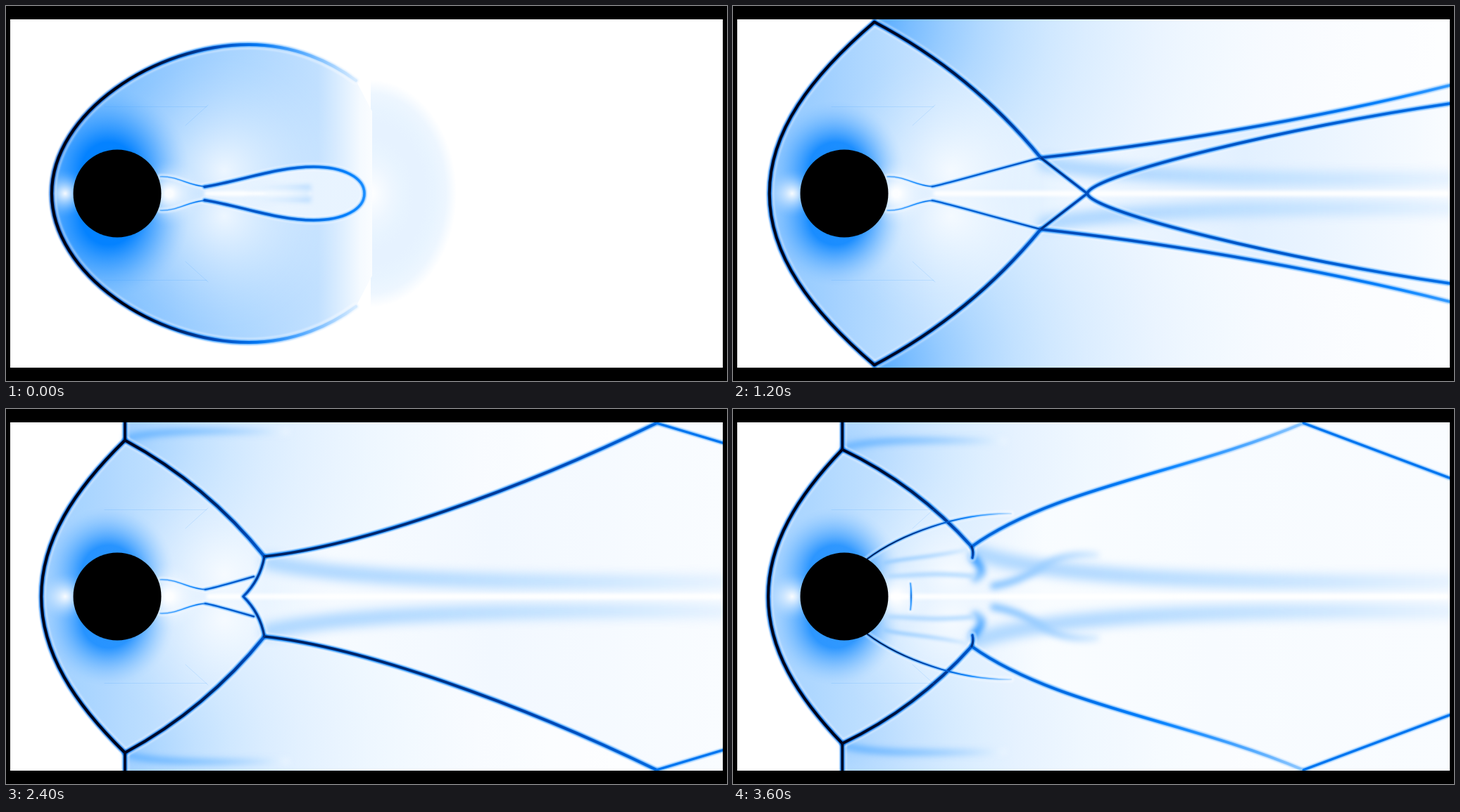
An HTML page with a canvas for the animation above (4 s loop, 1024 by 534 pixels).

```html
<!DOCTYPE html>
<html lang="en">
<head>
<meta charset="utf-8">
<title>Flow past a cylinder</title>
<style>
html, body { margin: 0; width: 100%; height: 100%; overflow: hidden; background: #000; }
canvas { display: block; }
</style>
</head>
<body>
<canvas id="stage" width="1024" height="534"></canvas>
<script>
const canvas = document.getElementById('stage');
const ctx = canvas.getContext('2d');
const STEP = 400, COUNT = 10, AXIS = 267, TOP = 19, LEFT = 6, RIGHT = 1018;

// Key poses of the shock system behind the cylinder; steps between are blended.
// bend: heights of the two handles of the outer shock, as parts of its rise
const poses = [
  { at: 3, triple: [437, 216], stem: [503, 267], exit: [1018, 113], bend: [.15, .5], fade: [.72, .4] },
  { at: 5, triple: [392, 230], stem: [380, 267], exit: [1018, 25], bend: [.22, .6], fade: [.95, .75] },
  { at: 6, triple: [367, 210], stem: [337, 267], exit: [924, 20], bend: [.08, .5], fade: [.88, .6] },
  { at: 8, triple: [328, 183], stem: [304, 231], exit: [840, 20], bend: [.32, .38], fade: [.8, .4] },
  { at: 9, triple: [339, 196], stem: [340, 212], exit: [810, 20], bend: [.48, .6], fade: [.62, .22] }
];

const lerp = (a, b, k) => a + (b - a) * k;
const clamp = (v, lo = 0, hi = 1) => Math.min(hi, Math.max(lo, v));
const decay = (s, rate) => Math.exp(-s / rate);
const first = c => c.slice(0, 2), last = c => c.slice(-2);

function poseAt(s) {
  const i = Math.max(1, poses.findIndex(p => p.at >= s));
  const a = poses[i - 1], b = poses[i], k = (s - a.at) / (b.at - a.at);
  const blend = key => a[key].map((v, j) => lerp(v, b[key][j], k));
  return { triple: blend('triple'), stem: blend('stem'), exit: blend('exit'), bend: blend('bend'), fade: blend('fade') };
}

// Intensity scale: white, blue, deep blue, black
const scale = [[255, 255, 255], [128, 192, 255], [0, 128, 255], [0, 68, 176], [0, 0, 20]];
function tint(v) {
  const x = clamp(v) * 4, i = Math.min(3, Math.floor(x));
  return `rgb(${scale[i].map((c, j) => Math.round(lerp(c, scale[i + 1][j], x - i)))})`;
}

// Curves are flat lists: a start point, then bezier triples
function add(path, c) {
  for (let i = 2; i < c.length; i += 6) path.bezierCurveTo(...c.slice(i, i + 6));
}
function open(c) {
  const path = new Path2D();
  path.moveTo(...first(c));
  add(path, c);
  return path;
}
function region(start, curves, ...corners) {
  const path = new Path2D();
  path.moveTo(...start);
  curves.forEach(c => { path.lineTo(...first(c)); add(path, c); });
  corners.forEach(p => path.lineTo(...p));
  path.closePath();
  return path;
}
const straight = ([x, y], [u, v]) => [x, y, x, y, u, v, u, v];

// Arc whose belly stands off its chord by a part of the chord length
function bowed([x, y], [u, v], belly) {
  const dx = (v - y) * belly * 4 / 3, dy = (x - u) * belly * 4 / 3;
  return [x, y, lerp(x, u, 1 / 3) + dx, lerp(y, v, 1 / 3) + dy,
    lerp(x, u, 2 / 3) + dx, lerp(y, v, 2 / 3) + dy, u, v];
}

function bowShock(s, [cx, cy]) {
  if (s === 0) return [65, 267, 65, 152, 212, 55, 345, 55, 410, 55, 462, 80, 497, 106];
  const n = 50 + 15 * decay(s, 1.4);
  return [n, AXIS, n, lerp(AXIS, cy, .36), lerp(cx, n, .61), lerp(cy, AXIS, .32), cx, cy];
}

function bubble(s) {
  const x = 282, y = 257.5, tip = 509 + 383 * s;
  const cx = 437 + 308 * s, cy = 229 - 66 * Math.min(s, 1.6), w = cx - x, d = tip - cx;
  return [x, y, x + w * .33, lerp(y, cy, .29), cx - w * .33, cy, cx, cy,
    cx + d * .58, cy, tip, lerp(cy, AXIS, .4), tip, AXIS];
}

function outerShock({ triple: [x, y], exit: [u, v], bend }) {
  return [x, y, lerp(x, u, .25), lerp(y, v, bend[0]), lerp(x, u, .65), lerp(y, v, bend[1]), u, v];
}

function stroke(path, ink, width, blur, alpha = 1) {
  ctx.filter = `blur(${blur}px)`;
  ctx.globalAlpha = alpha;
  ctx.strokeStyle = ink;
  ctx.lineWidth = width;
  ctx.lineCap = 'round';
  ctx.stroke(path);
  ctx.filter = 'none';
  ctx.globalAlpha = 1;
}

function ramp(c, v0, v1) {
  const g = ctx.createLinearGradient(...first(c), ...last(c));
  for (let k = 0; k <= 1; k += .125) g.addColorStop(k, tint(lerp(v0, v1, k * k)));
  return g;
}

const haze = (c, v0, v1, width, blur) => stroke(open(c), ramp(c, v0, v1), width, blur);

// Sharp shocks: white halo, blue flanks and a darker core
function shocks(list) {
  list.forEach(([c, , , w]) => stroke(open(c), '#fff', w + 5, 1.5, .6));
  list.forEach(([c, v0, v1, w]) => stroke(open(c), ramp(c, v0 * .58, v1 * .58), w + .5, 1.3));
  list.forEach(([c, v0, v1, w]) => stroke(open(c), ramp(c, v0, v1), w * .62, .6));
}

function fill(path, paint) {
  ctx.fillStyle = paint;
  ctx.fill(path);
}

function glow(x, y, r0, r1, color, alpha) {
  const g = ctx.createRadialGradient(x, y, r0, x, y, r1);
  for (let k = 0; k <= 1; k += .125) g.addColorStop(k, `rgba(${color},${alpha * (1 - k) ** 1.6})`);
  ctx.fillStyle = g;
  ctx.fillRect(LEFT, TOP, RIGHT - LEFT, AXIS - TOP);
}

// Compressed gas behind the bow shock
function shadeFront(s, bow, corner) {
  const reach = s ? 1300 : 518, length = s ? 300 : 450, tone = .155 + .12 * decay(s, 3);
  const g = ctx.createLinearGradient(50, 0, RIGHT, 0);
  for (let k = 0; k <= 1; k += 1 / 32) {
    const x = lerp(50, RIGHT, k);
    g.addColorStop(k, tint(tone * Math.exp(-(((x - 50) / length) ** 1.5)) * clamp((reach - x) / 70) + (s ? .012 : 0)));
  }
  const edge = s ? [[corner[0], TOP], [RIGHT, TOP], [RIGHT, AXIS]] : [[520, 150], [520, AXIS]];
  ctx.save();
  ctx.clip(region(first(bow), [bow], ...edge));
  ctx.fillStyle = g;
  ctx.fillRect(0, 0, 1024, AXIS);
  glow(310, 235, 0, 180, '255,255,255', .8);
  glow(146, 232, 38, 92 + 22 * decay(s, 2), '0,128,255', .72 + .25 * decay(s, 4));
  glow(84, AXIS, 0, 34, '255,255,255', .95);
  glow(232, AXIS, 5, 48, '255,255,255', .95);
  ctx.restore();
}

// Gas compressed again by the shock reflected from the wall
function shadeBack(s, corner, curves) {
  const back = .18 + .22 * decay(Math.abs(s - 2.5), 1.5);
  const g = ctx.createRadialGradient(...corner, 0, ...corner, 800);
  for (let k = 0; k <= 1; k += .0625) g.addColorStop(k, tint(back * Math.exp(-3.6 * k) * (1 - k * .5)));
  const end = last(curves[curves.length - 1]);
  fill(region([corner[0], TOP], curves, [end[0], TOP]), g);
}

function shadeCore(out, startX, v) {
  const g = ctx.createLinearGradient(first(out)[0], 0, RIGHT, 0);
  [[0, 0, 0], [.15, v * .6, .9], [.5, v, 1], [1, .012, 1]].forEach(([k, t, a]) =>
    g.addColorStop(k, tint(t).replace('rgb', 'rgba').replace(')', `,${a})`)));
  fill(region([startX, AXIS], [out], [RIGHT, last(out)[1]], [RIGHT, AXIS]), g);
}

// Faint wave running ahead of the first bubble
function shadeAhead() {
  ctx.save();
  ctx.translate(518, AXIS);
  ctx.scale(122, 162);
  const g = ctx.createRadialGradient(0, 0, 0, 0, 0, 1);
  for (let k = 0; k <= 1; k += .125) g.addColorStop(k, tint(.16 * k * (1 - k) + .02 * k * (k < 1)));
  ctx.fillStyle = g;
  ctx.beginPath();
  ctx.arc(0, 0, 1, -Math.PI / 2, 0);
  ctx.lineTo(0, 0);
  ctx.fill();
  ctx.restore();
}

const axisLine = (from, to) => haze(straight([from, AXIS], [to, AXIS]), 0, 0, 7, 2.2);
const throat = [[219, 243, 245, 242, 258, 256, 283, 257], .38, .62, 2];

function drawBubble(s, corner) {
  const blob = bubble(s), list = [throat, [blob, .7, s ? .22 : .45, 5.5]];
  if (s) {
    const refl = s === 1
      ? [...corner, 430, 100, 690, 200, 868, 20]
      : [...corner, 460, 170, 720, 300, RIGHT, 158];
    shadeBack(s, corner, [refl]);
    list.push([refl, 1, .12, 7]);
  }
  shadeCore(blob, first(blob)[0], .06 - .01 * s);
  const x = 345 + 190 * s, len = 85 + 80 * s;
  axisLine(285, x + len);
  haze(straight([x, 259 - 8 * s], [x + len, 258 - 10 * s]), .05, .14, 7 + 2 * s, 3 + s);
  haze(straight([x + 25, 266 - 4 * s], [x + len, 266 - 5 * s]), .04, .12, 5, 3);
  return list;
}

function drawWake(s, corner) {
  const pose = poseAt(s), { triple, stem, exit, fade } = pose;
  const refl = bowed(corner, triple, .05), out = outerShock(pose);
  const [tx, ty] = triple, [mx, my] = stem;
  shadeBack(s, corner, [refl, out]);
  shadeCore(out, Math.min(mx, tx), .05 * decay(s - 3, 3) + .008);

  haze([tx + 6, ty + 8, tx + 90, lerp(ty, 246, .75), tx + 250, 249, RIGHT, 246], .16, .05, 22, 7);
  axisLine(s < 7 ? 288 : 225, RIGHT);

  const list = [
    [refl, .98, .66, 6.5],
    [out, ...fade, 6],
    [bowed(triple, stem, s > 3 ? .08 : 0), .82, .7, 5]
  ];
  if (s === 3) list.push([[mx, AXIS, 510, 240, 790, 172, RIGHT, 139], .7, .58, 6]);
  if (exit[0] < RIGHT) {
    const run = RIGHT - exit[0];
    list.push([straight(exit, [RIGHT, exit[1] + .44 * (run - 30)]), .55, .55, 5]);
  }
  if (s < 8) {
    const hit = s < 6 ? triple : [lerp(tx, mx, .5), lerp(ty, my, .5)];
    list.push(throat, [[283, 257, 300, 254, 325, 246, ...hit], .64, .72, 3.5]);
  } else {
    list.push(...drawSeparation(s - 8, stem));
  }
  return list;
}

// Flow torn off the cylinder, growing with k
function drawSeparation(k, [mx, my]) {
  haze([mx + 2, my, mx + 14, my + 14, mx + 18, my + 22, mx + 4, my + 30], .4, .2, 11, 4);
  haze([215, 225 - 6 * k, 245, 212, 280, 212, mx - 2, 213 - 14 * k], .2, .06, 5, 2.2);
  haze([222, 238, 250, 238, 280, 232, mx, 238], .16, .14, 6, 2.5);
  if (k) haze([370, 252, 440, 240, 440, 203, 515, 208], .24, .08, 10, 4);
  const x = 239 + 14 * k;
  return [
    [[202 - 12 * k, 221 - 7 * k, 228 + 10 * k, 208 - 30 * k, 262 + 58 * k, 202 - 54 * k, 305 + 90 * k, 203 - 54 * k], .9, .12, 2.8],
    [[x - 1, 248, x, 254, x, 260, x, AXIS], .4, .65, 2.2]
  ];
}

function draw(s) {
  const corner = [145 + 98 * decay(s - 1, 3.55), 20 + 58 * (1 - decay(Math.max(s - 2.7, 0), 6))];
  const bow = bowShock(s, corner);
  ctx.fillStyle = '#000';
  ctx.fillRect(0, 0, 1024, 534);
  ctx.save();
  ctx.beginPath();
  ctx.rect(LEFT, TOP, RIGHT - LEFT, AXIS - TOP);
  ctx.clip();
  ctx.fillStyle = '#fff';
  ctx.fillRect(LEFT, TOP, RIGHT - LEFT, AXIS - TOP);

  if (!s) shadeAhead();
  shadeFront(s, bow, corner);
  const list = s < 3 ? drawBubble(s, corner) : drawWake(s, corner);
  list.push([bow, s ? .99 : 1.15, s ? .99 : .08, 6.5]);
  if (corner[1] > 25) {
    const [x, y] = corner;
    haze([x + 4, y - 3, x + 40, y - 14, x + 110, y - 14, x + 230, y - 12], .3, .04, 9, 4);
    list.push([straight([x, 10], corner), .97, .97, 6]);
  }
  shocks(list);
  stroke(new Path2D('M140 143.5H285M255 170L287 141'), tint(.4), .8, .3, .2);

  ctx.fillStyle = '#000';
  ctx.beginPath();
  ctx.arc(158, AXIS, 62.5, 0, 7);
  ctx.fill();
  ctx.restore();

  // The lower half mirrors the upper one
  ctx.save();
  ctx.setTransform(1, 0, 0, -1, 0, 2 * AXIS);
  ctx.drawImage(canvas, 0, 0, 1024, AXIS, 0, 0, 1024, AXIS);
  ctx.restore();
}

let shown = -1;
const begin = performance.now();
function tick() {
  const step = Math.floor((performance.now() - begin) / STEP) % COUNT;
  if (step !== shown) draw(shown = step);
  requestAnimationFrame(tick);
}
tick();
</script>
</body>
</html>
```
